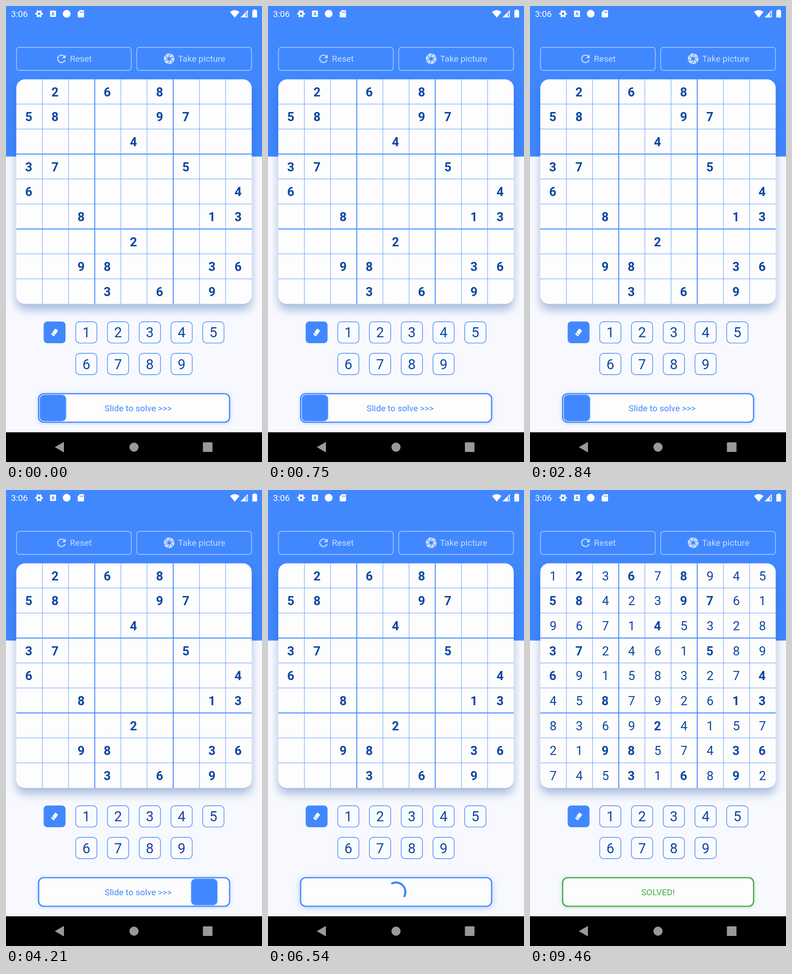
An HTML page for the animation above (9500 ms loop, 561 by 998 pixels).

```html
<!DOCTYPE html>
<html lang="en">
<head>
<meta charset="utf-8">
<title>Sudoku solver</title>
<style>
  html, body { margin: 0; width: 100%; height: 100%; overflow: hidden; background: #f8f9fe; }
  svg { display: block; width: 100%; height: 100%; }
  text { font-family: Roboto, sans-serif; font-size: 19.1px; }
  .digit { font-size: 27.3px; fill: #0d47a1; text-anchor: middle; }
  .given { font-weight: 700; }
  .key { font-size: 30.5px; }
  .mid { text-anchor: middle; }
  #board { filter: drop-shadow(0 13px 10px rgba(13, 71, 161, .34)); }
</style>
</head>
<body>
<svg viewBox="0 0 561 998" preserveAspectRatio="none">
  <defs>
    <clipPath id="card"><rect x="22.5" y="160.5" width="516" height="491.5" rx="19"/></clipPath>
  </defs>
  <rect width="561" height="998" fill="#f8f9fe"/>
  <rect width="561" height="329.5" fill="#4188ff"/>

  <!-- status bar -->
  <g fill="#fff">
    <text x="11" y="23.5">3:06</text>
    <g fill="none" stroke="#fff" transform="translate(72.5 17)">
      <circle r="4.6" stroke-width="3.6"/>
      <circle r="7" stroke-width="2.8" stroke-dasharray="3.65 3.68" stroke-dashoffset="1.8"/>
    </g>
    <rect x="96.5" y="10" width="13" height="14" rx="1.5"/>
    <text x="103" y="21" class="mid" style="font-size:10.5px;font-weight:700" fill="#4188ff">A</text>
    <circle cx="133" cy="17" r="8.5"/>
    <path d="M162 9H169a2 2 0 0 1 2 2V23a2 2 0 0 1-2 2H159a2 2 0 0 1-2-2V14z"/>
    <path d="M163 12v3.5M165.7 12v3.5M168.4 12v3.5" stroke="#4188ff" stroke-width="1.3"/>
    <path d="M491 13.2Q501.300 5 511.500 13.200L501.300 25.500z"/>
    <path d="M530 9V25H514z" opacity=".35"/>
    <path d="M529.300 10.500V24.300H515.500z" fill="none" stroke="#fff" stroke-width="1.4"/>
    <path d="M525 14.500V25H514.500z"/>
    <path d="M543 9V7.500h4V9h2a1.200 1.200 0 0 1 1.200 1.200V24a1.200 1.200 0 0 1-1.200 1.200h-8a1.200 1.200 0 0 1-1.200-1.200V10.200A1.200 1.200 0 0 1 541 9z"/>
  </g>

  <!-- top buttons -->
  <g fill="none" stroke="#b5d0ff" stroke-width="1.4">
    <rect x="23" y="90.500" width="251.500" height="50.500" rx="6"/>
    <rect x="286.500" y="90.500" width="251.500" height="50.500" rx="6"/>
  </g>
  <g fill="#c6dbff">
    <path transform="translate(107.500 101.500) scale(1.170)" d="M17.650 6.350A8 8 0 1 0 19.730 14H17.650A6 6 0 1 1 12 6c1.660 0 3.140.690 4.220 1.780L13 11h7V4z"/>
    <text x="140" y="122">Reset</text>
    <text x="377" y="122">Take picture</text>
    <g id="shutter" transform="translate(357.500 115.500) scale(1.170)"><circle r="10"/></g>
  </g>

  <g id="board"><rect x="22.500" y="160.500" width="516" height="491.500" rx="19" fill="#fdfdfe"/></g>
  <g id="lines" clip-path="url(#card)" stroke="#4188ff"></g>
  <g id="givens"></g>
  <g id="solution"></g>

  <g id="keys">
    <rect x="82.500" y="690.500" width="48" height="47.500" rx="8" fill="#4188ff"/>
    <g transform="translate(106.500 714.500) rotate(36)">
      <rect x="-4" y="-8" width="8" height="16" rx="1.700" fill="#fff"/>
      <path d="M-4 3.700H4" stroke="#4188ff" stroke-width="1"/>
    </g>
  </g>

  <!-- slider -->
  <rect id="track" x="71.500" y="848.500" width="418.500" height="62.500" rx="11" fill="#fdfdfe" stroke-width="2.700"/>
  <g id="slide">
    <text x="289.700" y="886.500" class="mid" fill="#4188ff">Slide to solve &gt;&gt;&gt;</text>
    <rect id="handle" x="74.200" y="851" width="57.300" height="57.500" rx="9" fill="#4188ff"
          style="filter:drop-shadow(0 0 1.500px rgba(65,136,255,.5))"/>
  </g>
  <path id="spinner" fill="none" stroke="#4188ff" stroke-width="4.500" stroke-linecap="square"/>
  <text id="solved" x="280.500" y="886.500" class="mid" fill="#43a94a">SOLVED!</text>

  <!-- navigation bar -->
  <rect y="933" width="561" height="65"/>
  <g fill="#999">
    <path d="M107 965.500L127 954V977z"/>
    <circle cx="280.500" cy="965.500" r="10"/>
    <rect x="431.500" y="955" width="21" height="21" rx="1.500"/>
  </g>
</svg>
<script>
const LOOP = 9500, DRAG_START = 3300, DRAG_END = 4380, LOADING = 5645, SOLVED = 7645;
const TRAVEL = 355;
const BLUE = '#4188ff', GREEN = '#43a94a';

const puzzle = `.2.6.8... 58...97.. ....4.... 37....5.. 6.......4
  ..8....13 ....2.... ..98...36 ...3.6.9.`.split(/\s+/);
const answer = `123678945 584239761 967145328 372461589 691583274
  458792613 836924157 219857436 745316892`.split(/\s+/);

const el = id => document.getElementById(id);

function add(parent, tag, attrs, content = '') {
  const node = document.createElementNS('http://www.w3.org/2000/svg', tag);
  for (const name in attrs) node.setAttribute(name, attrs[name]);
  node.textContent = content;
  return parent.appendChild(node);
}

function buildBoard() {
  const cellW = 57.35, cellH = 54.65;
  for (let i = 1; i < 9; i++) {
    const x = 22.4 + i * cellW, y = 160 + i * cellH;
    const style = i % 3 ? { 'stroke-width': 1, opacity: .85 } : { 'stroke-width': 2 };
    add(el('lines'), 'path', { d: `M${x} 160V653M22 ${y}H539`, ...style });
  }
  for (let row = 0; row < 9; row++) {
    for (let col = 0; col < 9; col++) {
      const given = puzzle[row][col] !== '.';
      add(el(given ? 'givens' : 'solution'), 'text', {
        x: (given ? 49.9 : 50.6) + col * cellW,
        y: 197.7 + row * cellH,
        class: given ? 'digit given' : 'digit'
      }, answer[row][col]);
    }
  }
}

function buildKeys() {
  for (let n = 1; n <= 9; n++) {
    const x = 176 + (n - 1) % 5 * 69.6, y = n < 6 ? 714.3 : 783.5;
    add(el('keys'), 'rect', {
      x: x - 23.3, y: y - 23.3, width: 46.6, height: 46.6, rx: 8.5,
      fill: '#fafbfe', stroke: BLUE, 'stroke-width': 1.4
    });
    add(el('keys'), 'text', { x, y: y + 11, class: 'digit key' }, n);
  }
}

function buildShutter() {
  add(el('shutter'), 'path', { d: 'M-3.2 0L-1.6-2.8H1.6L3.2 0L1.6 2.8H-1.6z', fill: BLUE });
  for (let angle = 0; angle < 360; angle += 60) {
    add(el('shutter'), 'path', {
      d: 'M-1.6-2.5H10.2', stroke: BLUE, 'stroke-width': 1, transform: `rotate(${angle})`
    });
  }
}

const clamp = u => Math.min(1, Math.max(0, u));
const smooth = u => u * u * (3 - 2 * u);

// cubic-bezier(.4, 0, .2, 1), solved for its parameter by bisection
function fastOutSlowIn(x) {
  let low = 0, high = 1;
  for (let i = 0; i < 20; i++) {
    const s = (low + high) / 2, r = 1 - s;
    if (1.2 * r * r * s + .6 * r * s * s + s ** 3 < x) low = s; else high = s;
  }
  return low * low * (3 - 2 * low);
}

// Material indeterminate spinner: 1333 ms sweep, 2222 ms rotation
function spinnerPath(t) {
  const phase = t / 1333 % 1;
  const head = fastOutSlowIn(clamp(phase * 2));
  const tail = fastOutSlowIn(clamp(phase * 2 - 1));
  const start = Math.PI * (-.5 + 1.5 * tail + 2 * t / 2222 + .5 * phase);
  const sweep = Math.max(1.5 * Math.PI * (head - tail), .001);
  const point = a => `${280.5 + 20.6 * Math.cos(a)} ${879.7 + 20.6 * Math.sin(a)}`;
  return `M${point(start)}A20.6 20.6 0 ${+(sweep > Math.PI)} 1 ${point(start + sweep)}`;
}

function show(id, visible) {
  el(id).style.display = visible ? '' : 'none';
}

function draw(t) {
  const solved = t >= SOLVED, loading = t >= LOADING && !solved;
  show('solution', solved);
  show('solved', solved);
  show('spinner', loading);
  show('slide', t < LOADING);

  const drag = smooth(clamp((t - DRAG_START) / (DRAG_END - DRAG_START)));
  el('handle').setAttribute('transform', `translate(${TRAVEL * drag})`);
  if (loading) el('spinner').setAttribute('d', spinnerPath(t - LOADING));

  el('track').setAttribute('stroke', solved ? GREEN : BLUE);
  el('track').style.filter = solved ? 'drop-shadow(0 1px 4px rgba(67,169,74,.3))'
    : loading ? 'drop-shadow(0 2px 7px rgba(65,136,255,.4))'
    : 'drop-shadow(0 1px 4px rgba(65,136,255,.3))';
}

function tick() {
  draw(performance.now() % LOOP);
  requestAnimationFrame(tick);
}

buildBoard();
buildKeys();
buildShutter();
tick();
</script>
</body>
</html>
```
